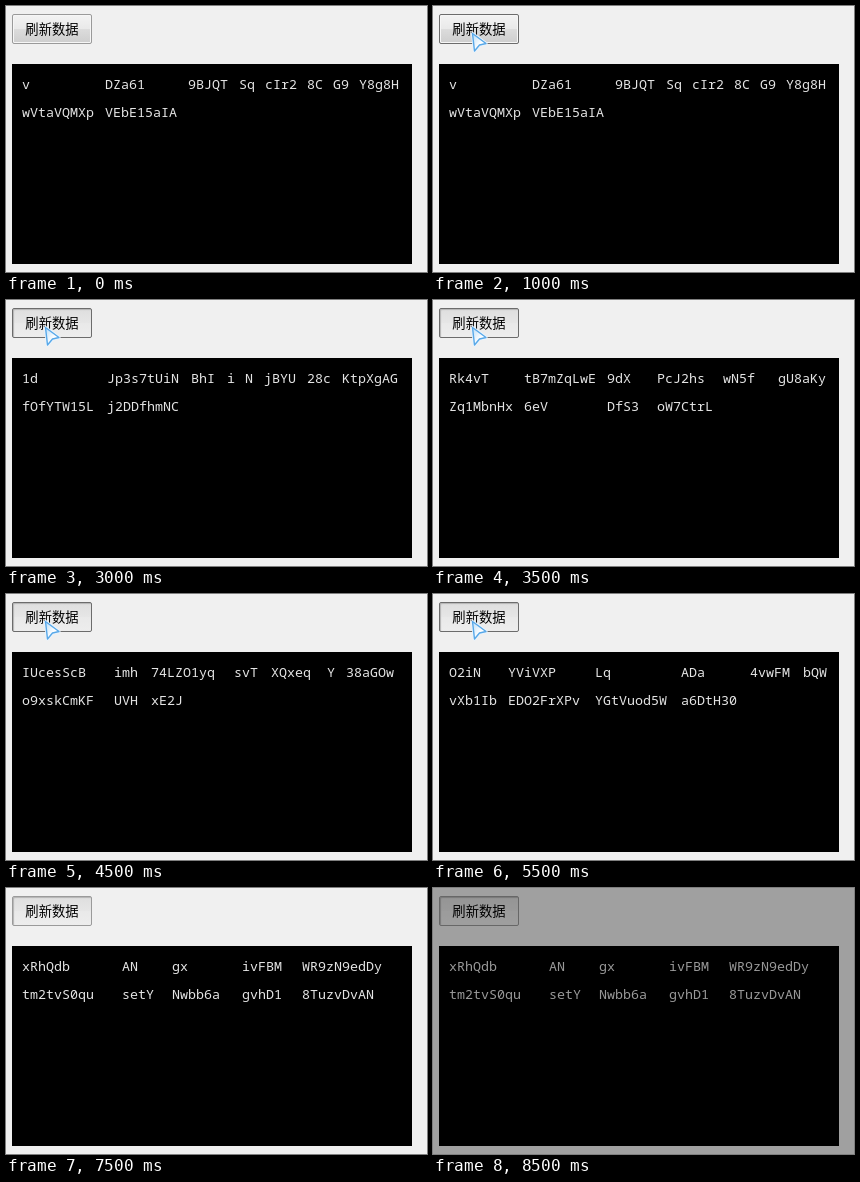
Recreate the animation shown at these times as an HTML page. Size 421x266 px, loop 9 s.

```html
<!DOCTYPE html>
<html lang="zh-CN">
<head>
<meta charset="utf-8">
<title>刷新数据</title>
<style>
  html, body { margin: 0; width: 100%; height: 100%; overflow: hidden; background: #f0f0f0; }
  .stage { position: relative; width: 421px; height: 266px; overflow: hidden; }
  .stage * { animation: 9s step-end infinite; }

  .button {
    position: absolute; left: 6px; top: 8px; width: 80px; height: 30px;
    box-sizing: border-box; border: 1px solid #9a9a9a; border-radius: 2px;
    background: linear-gradient(#f3f3f3, #e9e9e9 49%, #dcdcdc 51%, #cecece);
    box-shadow: inset 0 0 0 1px #f6f6f6;
    color: #000; font: 13.333px/28px "Noto Sans CJK SC", "Noto Sans CJK", sans-serif;
    text-align: center; white-space: nowrap;
    animation-name: button;
  }
  .panel { position: absolute; left: 6px; top: 58px; width: 400px; height: 200px; overflow: hidden; background: #000; }
  .strip { position: absolute; left: 0; top: 0; animation-name: pages; }
  .strip span {
    position: absolute; color: #e4e4e4; white-space: pre;
    font: 300 13.333px/16px "Noto Sans Mono", "Liberation Mono", monospace;
  }
  .cursor { position: absolute; left: 0; top: 0; width: 18px; height: 22px; animation-name: cursor; }
  .shade { position: absolute; inset: 0; background: #000; opacity: 0; animation-name: shade; }

  @keyframes button {
    0%, 83.3333% { border-color: #9a9a9a; }
    11.1111%, 33.3333% { border-color: #6c6c6c; }
    22.2222% {
      border-color: #8c8c8c;
      background: linear-gradient(#dedede, #e6e6e6 49%, #e9e9e9 51%, #ededed);
      box-shadow: inset 1px 1px 1px #b4b4b4;
    }
  }
  @keyframes pages {
    0% { transform: none; }
    16.6666% { transform: translateY(-200px); }
    33.3333% { transform: translateY(-400px); }
    38.8888% { transform: translateY(-600px); }
    50% { transform: translateY(-800px); }
    61.1111% { transform: translateY(-1000px); }
    72.2222%, 100% { transform: translateY(-1200px); }
  }
  @keyframes cursor {
    0%, 83.3333%, 100% { transform: translate(189px, 59px); visibility: hidden; }
    5.5555% { transform: translate(189px, 59px); visibility: visible; }
    11.1111% { transform: translate(37px, 25px); visibility: visible; }
  }
  @keyframes shade {
    0% { opacity: 0; }
    94.4444%, 100% { opacity: .3333; }
  }
</style>
</head>
<body>
<div class="stage">
  <div class="button">刷新数据</div>
  <div class="panel"><div class="strip" id="strip"></div></div>
  <svg class="cursor" viewBox="0 0 18 22">
    <defs>
      <linearGradient id="ice" x1="0" y1="0" x2="1" y2="1">
        <stop offset="0" stop-color="#b9dcf8"/>
        <stop offset=".6" stop-color="#fff"/>
      </linearGradient>
    </defs>
    <path d="M2.5 2.5 16 12.5 9.5 14 4.5 20Z" fill="none" stroke="#e8f4ff" stroke-width="3" stroke-linejoin="round"/>
    <path d="M2.5 2.5 16 12.5 9.5 14 4.5 20Z" fill="url(#ice)" stroke="#58a8e8" stroke-width="1.4" stroke-linejoin="round"/>
  </svg>
  <div class="shade"></div>
</div>
<script>
  // Each page: column positions, then two rows of words.
  const pages = [
    [[16, 99, 182, 233, 259, 301, 327, 353],
      "v DZa61 9BJQT Sq cIr2 8C G9 Y8g8H", "wVtaVQMXp VEbE15aIA"],
    [[16, 98, 180, 206, 288, 337],
      "Fjw3Wo8su 5GT5F 2G G4k7ijYBX IhE60 Fw1w1BR", "udpaW NaLZuSNiJ L 2NG2eOfxy"],
    [[16, 101, 185, 221, 239, 258, 301, 336],
      "1d Jp3s7tUiN BhI i N jBYU 28c KtpXgAG", "fOfYTW15L j2DDfhmNC"],
    [[16, 91, 174, 224, 290, 345],
      "Rk4vT tB7mZqLwE 9dX PcJ2hs wN5f gU8aKy", "Zq1MbnHx 6eV DfS3 oW7CtrL"],
    [[16, 108, 145, 228, 265, 321, 340],
      "IUcesScB imh 74LZO1yq svT XQxeq Y 38aGOw", "o9xskCmKF UVH xE2J"],
    [[16, 75, 162, 248, 317, 370],
      "O2iN YViVXP Lq ADa 4vwFM bQW", "vXb1Ib EDO2FrXPv YGtVuod5W a6DtH30"],
    [[16, 116, 166, 236, 296],
      "xRhQdb AN gx ivFBM WR9zN9edDy", "tm2tvS0qu setY Nwbb6a gvhD1 8TuzvDvAN"]
  ];
  const strip = document.getElementById("strip");
  pages.forEach(([cols, ...rows], page) => rows.forEach((row, line) =>
    row.split(" ").forEach((word, i) => {
      const cell = document.createElement("span");
      cell.textContent = word;
      cell.style.left = cols[i] - 6 + "px";
      cell.style.top = page * 200 + 12 + line * 28 + "px";
      strip.append(cell);
    })));
</script>
</body>
</html>
```
